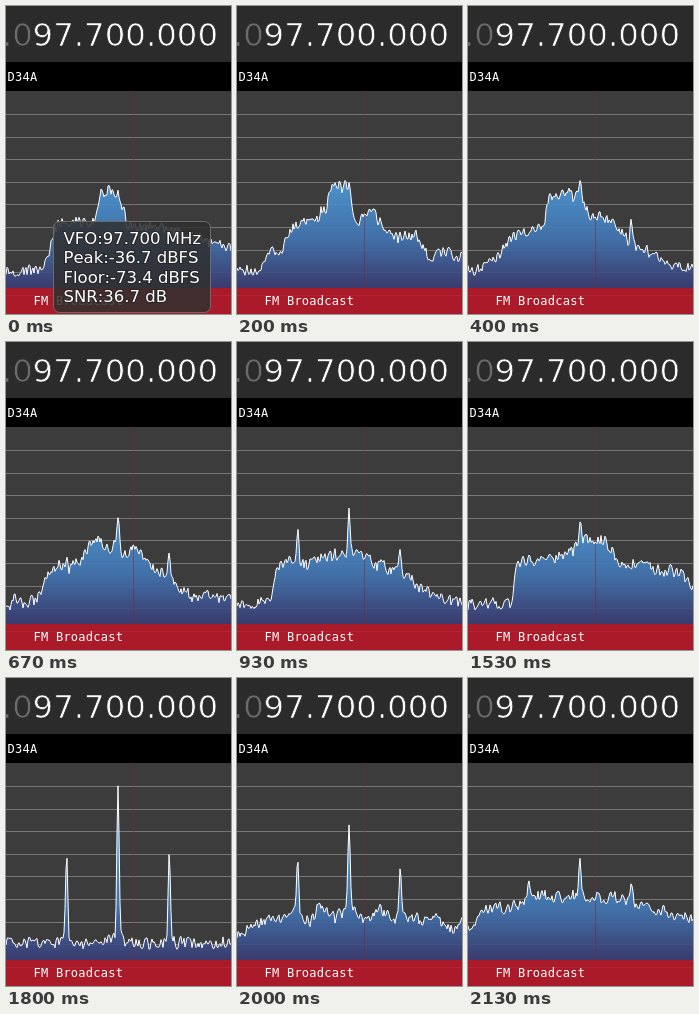
Recreate the animation shown at these times as an HTML page. Size 225x308 px, loop 2190 ms.

```html
<!DOCTYPE html>
<html lang="en">
<head>
<meta charset="utf-8">
<title>Spectrum</title>
<style>
  html, body { margin: 0; width: 100%; height: 100%; overflow: hidden; background: #2b2b2b; }
  svg { display: block; width: 225px; height: 308px; }
  text { fill: #fff; white-space: pre; }
  /* The outline in the bar's colour thins the digits. */
  .freq { font: 32.4px "DejaVu Sans", sans-serif; stroke: #2b2b2b; stroke-width: .7px; }
  .dim { fill: #6c6c6c; }
  .label { font: 12px "DejaVu Sans Mono", monospace; letter-spacing: .25px; }
  .tip text {
    font: 16.5px "DejaVu Sans", sans-serif; font-kerning: none;
    paint-order: stroke; stroke: #1c1c1c; stroke-opacity: .6; stroke-width: 2px;
  }
</style>
</head>
<body>
<svg viewBox="0 0 225 308">
  <defs>
    <linearGradient id="blue" gradientUnits="userSpaceOnUse" x1="0" y1="85" x2="0" y2="282">
      <stop offset="0" stop-color="#5fb0ea"/>
      <stop offset=".5" stop-color="#4c94d2"/>
      <stop offset=".75" stop-color="#4274b0"/>
      <stop offset="1" stop-color="#3a3a70"/>
    </linearGradient>
  </defs>
  <rect width="225" height="56" fill="#2b2b2b"/>
  <rect y="56" width="225" height="29" fill="#000"/>
  <rect y="85" width="225" height="197" fill="#3c3c3c"/>
  <path id="grid" stroke="#777" fill="none" shape-rendering="crispEdges"/>
  <path id="area" fill="url(#blue)" fill-opacity=".92"/>
  <path d="M127.5 85V282" stroke="#822434" stroke-opacity=".5"/>
  <path id="trace" fill="none" stroke="#fff" stroke-linejoin="round"/>
  <rect y="282" width="225" height="26" fill="#aa1a29"/>
  <path d="M0 289.5H225" stroke="#fff" stroke-opacity=".06"/>
  <text class="freq dim" x="-4.1" y="40.3">.0</text>
  <text class="freq" x="26.6" y="40.3">97.700.000</text>
  <text class="label" x="1.5" y="75">D34A</text>
  <text class="label" x="27.5" y="299">FM Broadcast</text>
  <g class="tip" id="tip">
    <rect x="47.5" y="215.5" width="157" height="91" rx="6" fill="#303030" fill-opacity=".85" stroke="#6c6c6c"/>
    <text x="57.5" y="238">VFO:97.700 MHz</text>
    <text x="57.5" y="257.3">Peak:-36.7 dBFS</text>
    <text x="57.5" y="276.7">Floor:-73.4 dBFS</text>
    <text x="57.5" y="296">SNR:36.7 dB</text>
  </g>
</svg>
<script>
const LOOP = 2190, STEP = 200 / 3, LAST = 32;
const WIDTH = 225, TOP = 85.4, FLOOR = 282, NOISE = 7;
const CARRIER = 112, SPACING = 51.3;
const $ = id => document.getElementById(id);

const mix = (a, b, k) => a + (b - a) * k;
const edge = v => 1 / (1 + Math.exp(-v));

// Raised stretch with a soft slope on either side
const hump = (left, right, height, rise = 3, fall = rise) =>
  x => height * edge((x - left) / rise) * edge((right - x) / fall);

// Narrow peaks: left tone, centre, right tone
const carriers = (...heights) => x => heights.reduce((sum, h, i) =>
  sum + h * Math.exp(-(((x - CARRIER - (i - 1) * SPACING) / 1.6) ** 2)), 0);

const poses = [
  { at: 0, base: 264, parts: [hump(45, 215, 47, 2.5, 30), hump(91, 117, 33, 1.5)] },
  { at: 6, base: 264, parts: [hump(35, 175, 42, 9, 16), hump(78, 148, 16, 1.5, 4),
    hump(78, 115, 18, 1.5), carriers(0, 18, 20)] },
  { at: 14, base: 261, parts: [hump(36, 178, 40, 1.5, 14), hump(86, 133, 8, 4), carriers(32, 44, 22)] },
  { at: 19, base: 256, parts: [hump(28, 172, 20, 9, 6), hump(46, 66, 17, 5),
    hump(102, 145, 30, 2.5, 1.5), hump(104, 119, 14, 2), carriers(0, 12, 8)] },
  { at: 23, base: 262, parts: [hump(46, 224, 34, 1.5, 5), hump(48, 165, 11, 2, 10),
    hump(105, 143, 20), carriers(0, 18, 0)] },
  { at: 27, base: 265, parts: [hump(97, 115, 6), carriers(89, 150, 93)] },
  { at: 32, base: 256, parts: [hump(10, 232, 26, 4, 20), hump(54, 166, 11, 4), carriers(20, 42, 24)] }
];

const level = (pose, x) => pose.parts.reduce((y, part) => y - part(x), pose.base);

// Seeded value in -1..1
function rand(n, seed) {
  const v = Math.sin(n * 127.1 + seed * 311.7) * 43758.5453;
  return (v - Math.floor(v)) * 2 - 1;
}

function ripple(x, seed) {
  const n = Math.floor(x);
  return mix(rand(n, seed), rand(n + 1, seed), x - n);
}

function spectrum(step) {
  const i = Math.max(1, poses.findIndex(p => p.at >= step));
  const a = poses[i - 1], b = poses[i];
  const k = (step - a.at) / (b.at - a.at);
  const wobble = 32 * k * (1 - k);
  const line = [];
  for (let x = 0; x <= WIDTH; x++) {
    const y = mix(level(a, x), level(b, x), k)
      + NOISE * ripple(x / 1.4, step + 1)
      + wobble * ripple(x / 9, step + 50);
    line.push(x + " " + Math.min(FLOOR - 1, y).toFixed(1));
  }
  return "M" + line.join("L");
}

let grid = "";
for (let i = 1; i < 9; i++) grid += `M0 ${Math.round(TOP + i * 22.6) + 0.5}H${WIDTH}`;
$("grid").setAttribute("d", grid);

let shown = -1;
function draw(step) {
  const d = spectrum(step);
  $("trace").setAttribute("d", d);
  $("area").setAttribute("d", `${d}V${FLOOR}H0Z`);
  $("tip").style.display = step === 0 ? "" : "none";
  shown = step;
}

const start = performance.now();
function tick() {
  const t = (performance.now() - start) % LOOP;
  const step = Math.min(LAST, Math.floor((t + 4) / STEP));
  if (step !== shown) draw(step);
  requestAnimationFrame(tick);
}
draw(0);
requestAnimationFrame(tick);
</script>
</body>
</html>
```
